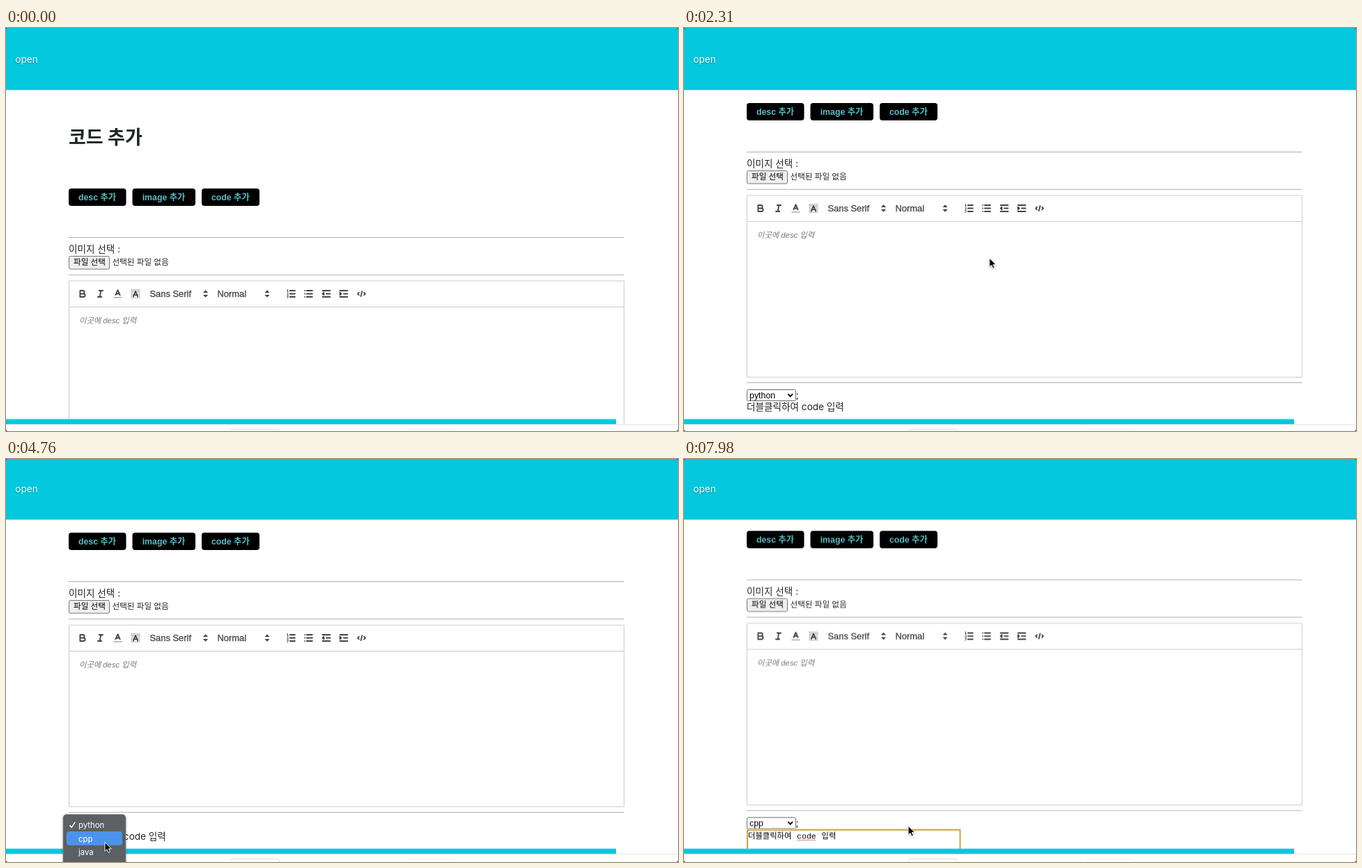
An HTML page for the animation above (8 s loop, 965x580 px).

```html
<!DOCTYPE html>
<html lang="ko">
<head>
<meta charset="utf-8">
<title>코드 추가</title>
<style>
html, body { margin: 0; width: 100%; height: 100%; overflow: hidden; background: #fff; }
svg { display: block; }
text { font-family: Inter, "Noto Sans CJK KR", "Noto Sans CJK", sans-serif; fill: #212529; white-space: pre; }
.arial { font-family: "Liberation Sans", "Noto Sans CJK KR", "Noto Sans CJK", sans-serif; }
.title { font-size: 27px; font-weight: 700; }
.body { font-size: 13.6px; }
.add text { font-size: 12.3px; font-weight: 700; fill: #58bfc9; }
.open { font-size: 13.6px; fill: #fff; text-shadow: 0 1px 2px rgba(0,0,0,.35); }
.small { font-size: 11.6px; }
.picker { font-size: 12.9px; fill: #444; stroke: #444; stroke-width: .3px; }
.hint { font-size: 11.3px; font-style: italic; fill: #777; }
.select { font-size: 12.4px; fill: #000; }
.mono { font-family: "Liberation Mono", "Noto Sans CJK KR", "Noto Sans CJK", monospace; font-size: 11.6px; fill: #000; }
.hr { stroke: #b0b0b0; }
.frame { fill: none; stroke: #ccc; }
.icon { fill: none; stroke: #444; stroke-width: 2; stroke-linecap: round; stroke-linejoin: round; }
.icon .thin { stroke-width: 1; }
.icon .solid, .arrows { fill: #444; }
.menu text { font-size: 11.4px; fill: #fff; }

/* 1% = 80 ms */
.window, .page, .pointer, .scroller, .menu, .mark, .label, .before, .after { animation: 8s linear infinite; }
.window { animation-name: nudge; animation-timing-function: step-end; }
.page { animation-name: scroll; }
.pointer { animation-name: point; }
.scroller { animation-name: scroller; animation-timing-function: step-end; }
.menu { animation-name: menu; }
.mark { animation-name: mark; animation-timing-function: step-end; }
.before { animation-name: hide; animation-timing-function: step-end; }
.after { animation-name: show; animation-timing-function: step-end; }
.label { animation-timing-function: step-end; }
.python { animation-name: hideLabel; }
.cpp { animation-name: showLabel; }

@keyframes nudge { 0% { transform: none; } 34.1%, 100% { transform: translateY(-2px); } }
@keyframes scroll {
  0%, 24.4% { transform: translateY(0); animation-timing-function: cubic-bezier(.3,.2,.3,1); }
  28.7%, 94.49% { transform: translateY(-123px); }
  94.5%, 100% { transform: translateY(-125.6px); }
}
@keyframes point {
  0%, 5.2% { transform: translate(475px,562px); opacity: 0; }
  5.21% { transform: translate(475px,562px); opacity: 1; animation-timing-function: ease-out; }
  10.5%, 24.5% { transform: translate(440px,331.5px); opacity: 1; }
  28.9%, 33% { transform: translate(438.5px,331px); animation-timing-function: ease-in-out; }
  38.5% { transform: translate(193.5px,513.5px); animation-timing-function: ease-out; }
  42%, 46.4% { transform: translate(145px,523px); animation-timing-function: ease-in-out; }
  54%, 66% { transform: translate(142px,551.5px); }
  71.5%, 82.5% { transform: translate(138px,550.5px); animation-timing-function: ease-in-out; }
  91%, 95% { transform: translate(205px,540px); animation-timing-function: ease-in-out; }
  99.2%, 100% { transform: translate(322px,528px); opacity: 1; }
}
@keyframes scroller { 0% { opacity: 0; } 34.1% { opacity: 1; } 43.6%, 100% { opacity: 0; } }
@keyframes menu {
  0%, 43.7% { opacity: 0; }
  43.71%, 70% { opacity: 1; }
  71.7%, 73% { opacity: .03; }
  73.5%, 100% { opacity: 0; }
}
@keyframes mark { 0% { transform: translateY(-20px); } 50%, 100% { transform: none; } }
@keyframes hideLabel { 0% { opacity: 1; } 73.5%, 100% { opacity: 0; } }
@keyframes showLabel { 0% { opacity: 0; } 73.5%, 100% { opacity: 1; } }
@keyframes hide { 0% { opacity: 1; } 94.5%, 100% { opacity: 0; } }
@keyframes show { 0% { opacity: 0; } 94.5%, 100% { opacity: 1; } }
</style>
</head>
<body>
<svg width="965" height="580" viewBox="0 0 965 580">
  <defs>
    <clipPath id="view"><rect y="80" width="965" height="490"/></clipPath>
    <filter id="soft" x="-20%" y="-20%" width="140%" height="140%">
      <feDropShadow dx="0" dy="1" stdDeviation="1.5" flood-opacity=".35"/>
    </filter>
    <g id="arrows" class="arrows"><path d="M-3.6-1.6L0-5.2 3.6-1.6ZM-3.6 1.6L0 5.2 3.6 1.6Z"/></g>
  </defs>

  <g class="window">
    <g clip-path="url(#view)">
      <g class="page">
        <text class="title" x="90" y="167">코드 추가</text>
        <g class="add">
          <rect x="90" y="231" width="82.5" height="25" rx="4"/>
          <rect x="181.5" y="231" width="90.5" height="25" rx="4"/>
          <rect x="281" y="231" width="83" height="25" rx="4"/>
          <text class="arial" x="104" y="248">desc 추가</text>
          <text class="arial" x="195.7" y="248">image 추가</text>
          <text class="arial" x="295" y="248">code 추가</text>
        </g>
        <path class="hr" d="M90 301.5H887.5M90 355.3H887.5M90 633.5H887.5"/>
        <text class="body" x="90" y="323">이미지 선택 :</text>
        <rect x="90.5" y="328.5" width="58" height="18.5" rx="2" fill="#efefef" stroke="#767676"/>
        <text class="small" x="97" y="341.3" style="fill:#000">파일 선택</text>
        <text class="small" x="152.5" y="341.3">선택된 파일 없음</text>

        <path class="frame" d="M90.5 364H887.5V625.5H90.5ZM90.5 401.5H887.5"/>
        <g id="toolbar"></g>
        <text class="arial picker" x="206.5" y="387">Sans Serif</text>
        <use href="#arrows" x="286.5" y="382.5"/>
        <text class="arial picker" x="303.5" y="387">Normal</text>
        <use href="#arrows" x="375" y="382.5"/>
        <text class="arial hint" x="105" y="424.6">이곳에 desc 입력</text>

        <rect x="90.5" y="643.5" width="70" height="16" rx="2" fill="#fff" stroke="#6b6b6b"/>
        <text class="arial select label python" x="94" y="655.6">python</text>
        <text class="arial select label cpp" x="94" y="655.6">cpp</text>
        <path d="M149.3 649.7l3.4 3.4 3.4-3.4" fill="none" stroke="#000" stroke-width="1.9"/>
        <text class="body" x="160.8" y="656">;</text>
        <text class="body before" x="90" y="673.2">더블클릭하여 code 입력</text>
        <g class="after">
          <rect x="91" y="661.5" width="305.5" height="60" fill="#fff" stroke="#c6a240" stroke-width="2"/>
          <text class="mono" x="92" y="673.6" style="font-size:11.3px">더블클릭하여</text>
          <text class="mono" x="162" y="674">code</text>
          <text class="mono" x="197.5" y="673.6" style="font-size:11.3px">입력</text>
          <path d="M162.5 676.3H190" stroke="#e25a52" stroke-width="1.5" stroke-dasharray="1.5 1.2"/>
        </g>
      </g>
    </g>

    <rect y="88" width="965" height="2" fill="#b9eff5"/>
    <rect width="965" height="89" fill="#03c8de"/>
    <text class="open" x="13.3" y="49.5">open</text>
    <rect y="563" width="876" height="7.5" fill="#03c8de"/>
    <path d="M0 570.8H965" stroke="#e3e3e3"/>
    <rect x="322" y="577.5" width="71" height="20" rx="4" fill="#fff" stroke="#ddd"/>
    <rect x="577" y="577.5" width="69" height="20" rx="4" fill="#fff" stroke="#eee"/>
    <path d="M0 563H876" stroke="#5fdce9"/>
  </g>

  <rect class="scroller" x="962" y="87" width="3" height="482" fill="#ececec"/>
  <path d="M0 0H2L0 2ZM965 0H963L965 2ZM0 580V578L2 580ZM965 580V578L963 580Z" fill="#444"/>

  <g class="menu">
    <rect x="82" y="511.5" width="90" height="90" rx="5" fill="#5c6164" stroke="#85898b" stroke-width=".6" filter="url(#soft)"/>
    <rect class="mark" x="87" y="536" width="80" height="20" rx="4" fill="#4b94ea"/>
    <path d="M91.5 527l2.7 3.3 5-7.6" fill="none" stroke="#fff" stroke-width="1.5"/>
    <text x="104" y="530.8">python</text>
    <text x="104" y="550.6">cpp</text>
    <text x="104" y="570.4">java</text>
  </g>

  <g class="pointer">
    <path d="M0 0V13L3 10.3 5.1 15 7.4 14 5.4 9.5H9.3Z" stroke="#fff" stroke-width="1" filter="url(#soft)"/>
  </g>
</svg>
<script>
const line = (d, cls = '') => `<path class="${cls}" d="${d}"/>`;
const rows = x => line(`M${x} 4H15M${x} 9H15M${x} 14H15`);
const dent = line('M3 4H15M9 9H15M3 14H15');

// Glyphs on an 18-unit grid, keyed by centre x.
const icons = [
  [110, line('M5 4H9.5a2.5 2.5 0 0 1 0 5H5ZM5 9H10.5a2.5 2.5 0 0 1 0 5H5Z')],
  [135.5, line('M7 4H13M5 14H11M8 14L10 4')],
  [160.5, '<g opacity=".4">' + line('M3 15H15') + '</g>' + line('M5.5 11L9 3 12.5 11M11.6 9H6.4')],
  [186, '<g stroke-dasharray="1 1.3" stroke-linecap="butt">' +
    line('M2.5 2.5H15.5V15.5H2.5ZM4.5 4.5H7V9L4.5 13ZM13.5 4.5H11V9L13.5 13Z', 'thin') + '</g>' +
    line('M5.5 13.5L9 5 12.5 13.5M11.6 11H6.4')],
  [409.5, rows(7) + line('M2.5 2.7L3.5 2V5.5M2.5 5.5H4.5M2.6 8Q4.5 7 4.4 8.6L2.5 10.5H4.5M2.5 12.5H4.4L3.5 14Q5.4 15.2 2.5 15.6', 'thin')],
  [434.5, rows(6) + line('M3 4h.01M3 9h.01M3 14h.01')],
  [460, dent + line('M5 7V11L3 9Z', 'solid')],
  [485, dent + line('M3 7V11L5 9Z', 'solid')],
  [510.5, line('M5 7L3 9 5 11M13 7L15 9 13 11M10 5L8 13')]
];
document.getElementById('toolbar').innerHTML = icons.map(([x, art]) =>
  `<g class="icon" transform="translate(${x - 8.1} 374.4) scale(.9)">${art}</g>`).join('');
</script>
</body>
</html>
```
